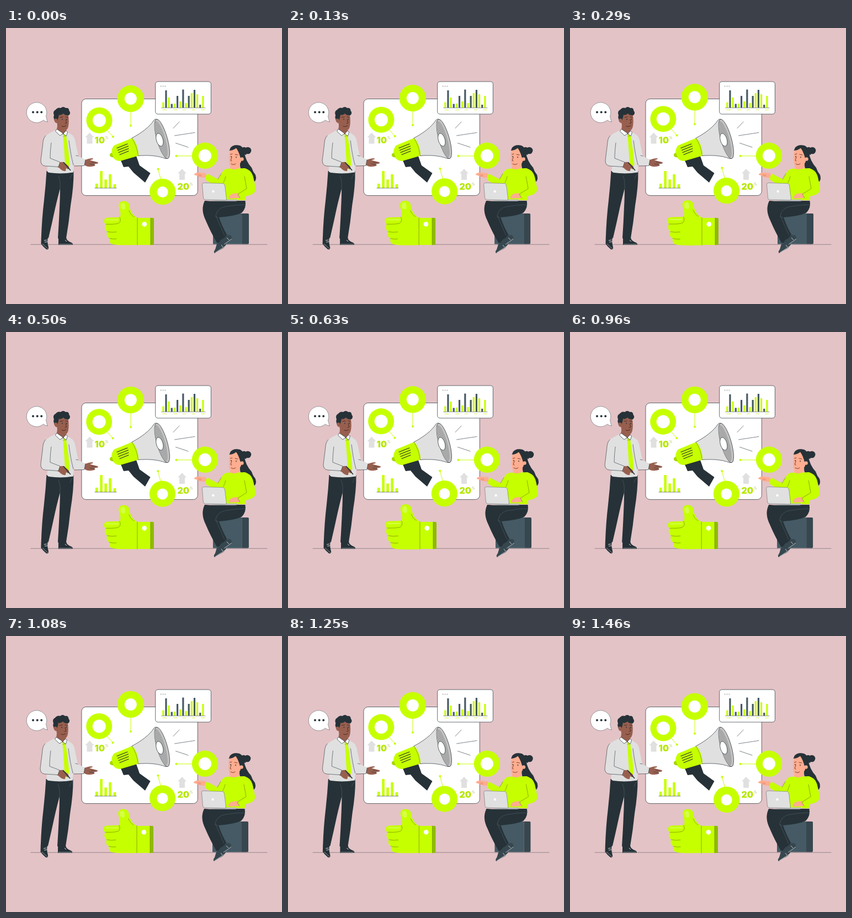
Recreate the animation shown at these times as an HTML page. Size 500 by 500 pixels, loop 1500 ms.

```html
<!DOCTYPE html>
<html lang="en">
<head>
<meta charset="utf-8">
<title>Marketing talk</title>
<style>
html, body { margin: 0; width: 100%; height: 100%; overflow: hidden; background: #e3c3c6; }
svg { display: block; width: 100vw; height: 100vh; }
.lime { fill: #c6ff00; }
.dark, .hair { fill: #263238; }
.white { fill: #fff; }
.grey { fill: #e0e0e0; }
.tan { fill: #985f4f; }
.peach { fill: #ffad90; }
.shoe { fill: #37474f; }
.line { fill: none; stroke: #263238; stroke-width: .6; stroke-linecap: round; stroke-linejoin: round; }
.edge { stroke: #263238; stroke-width: .7; stroke-linejoin: round; }
.fold { fill: none; stroke: #6f8f00; stroke-width: .7; stroke-linecap: round; }
.stem { fill: none; stroke: #c6ff00; stroke-width: 1; }
.num { font: 900 16px Inter, sans-serif; fill: #b5e800; }
.pct { font: 700 5.5px Inter, sans-serif; fill: #b9c98a; }
</style>
</head>
<body>
<svg viewBox="0 0 500 500" preserveAspectRatio="none">
  <rect width="500" height="500" fill="#e3c3c6"/>
  <path class="line" d="M45 392.200H473" stroke-opacity=".7"/>

  <!-- board -->
  <rect class="white edge" x="137" y="128.500" width="210.300" height="175" rx="8"/>
  <path class="grey" id="arrow" d="M151.5 189.5L159.5 198H156.5V209.5H146.5V198H143.5Z"/>
  <use href="#arrow" x="167.5" y="65.5"/>
  <text class="num" x="160.5" y="209">10</text><text class="pct" x="180" y="201">%</text>
  <text class="num" x="310.5" y="293">20</text><text class="pct" x="333" y="285">%</text>
  <g id="smallBars" class="lime"></g>
  <path class="line" d="M161 290H200"/>
  <path class="line" d="M303 181.500L314 170M305.500 195L342 189.500M307.500 208.500L330 216"/>

  <!-- megaphone -->
  <path class="dark" d="M208 240L236 232L242 249L261.500 263L252 280L231 262L222 251L213 252Z"/>
  <path class="grey edge" d="M227 200C246 190 260 179 268 167Q271 163 276 167L295 231Q296 237 289 236.500C274 231 257 230 239 231.500Z"/>
  <ellipse class="edge" cx="282.800" cy="201" rx="9.500" ry="37" transform="rotate(-16 282.800 201)" fill="#c4c4c4"/>
  <ellipse cx="281" cy="201.500" rx="7.500" ry="34" transform="rotate(-16 281 201.500)" fill="#a9a9a9"/>
  <ellipse class="white edge" cx="278.300" cy="202.500" rx="6" ry="12" transform="rotate(-16 278.300 202.500)"/>
  <path class="lime" d="M194 215Q196 212 200 211L228 199.500Q233 202 237 213T239.500 231.500L207 241Q198 241.500 193 233Q189 224 194 215Z"/>
  <path d="M191.500 226Q187 227.500 188 231Q190 235 195 234Z" fill="#a6d600"/>
  <path class="line" style="stroke-width:1.100" d="M201 217.500L220 210M202.500 221.500L221.500 214M204 225.500L222 218.500M206 229.500L222 223"/>
  <path class="fold" d="M228 199.500Q237 212 239.500 231.500"/>

  <!-- badges -->
  <g id="badgeTop">
    <path class="stem" d="M226 150V177"/><circle class="lime" cx="226" cy="177" r="2"/>
    <circle class="lime" cx="225.800" cy="128" r="24.200"/><circle class="white" cx="225.800" cy="128" r="11"/>
  </g>
  <g id="badgeLeft">
    <path class="stem" d="M182 184L194 197"/><circle class="lime" cx="193.800" cy="197" r="2"/>
    <circle class="lime" cx="169" cy="167.200" r="23.500"/><circle class="white" cx="169" cy="167.200" r="12"/>
  </g>
  <g id="badgeLow">
    <path class="stem" d="M281 276L275.500 256"/><circle class="lime" cx="275.500" cy="255.500" r="2"/>
    <circle class="lime" cx="283.700" cy="296.600" r="23.600"/><circle class="white" cx="283.700" cy="297" r="10"/>
  </g>
  <path class="stem" d="M309 231.800H340"/><circle class="lime" cx="308.500" cy="231.800" r="2"/>
  <circle class="lime" cx="360.500" cy="231.300" r="23.700"/><circle class="white" cx="360.500" cy="231.300" r="11.500"/>

  <!-- chart card -->
  <rect class="white edge" x="270.700" y="97.100" width="100.700" height="58.900" rx="4.500"/>
  <path d="M280.500 105.500h.01m4 0h.01m4 0h.01" stroke="#d5d5d5" stroke-width="3" stroke-linecap="round"/>
  <g id="cardBars"></g>
  <path class="line" d="M281.500 144.700H361" style="stroke-width:.5"/>
  <path d="M283.500 148.300H291M303 148.300H310M320 148.300H326M337 148.300H342.500M353.500 148.300H360" stroke="#c6ff00" stroke-width=".8"/>

  <!-- speech bubble -->
  <path class="white edge" stroke-opacity=".6" d="M72.500 160C74 164 74 168 75.500 170Q71 169.500 67.500 167A18.300 18.300 0 1 1 72.500 160Z"/>
  <path d="M49 152.500h.01m7.700 0h.01m7.500 0h.01" stroke="#263238" stroke-width="4" stroke-linecap="round"/>

  <!-- thumb -->
  <g id="thumb">
    <g id="hand">
      <path class="lime" d="M239 344.500C231 341 225 333 223.500 322C223 313 212 311.500 207 315.500C202 320 205 325 207 333Q208 340 206 342.800L184 343.500C176 344 176 353 181 355.500C178 360 179 366 183.500 369C181 374 183 379 187.500 381C186 387 189 391 194 392Q202 394 239 393Z"/>
      <path d="M207.500 321Q209 316 214 317Q217 323 215.500 328Q211 330 208.500 327Z" fill="#d6ff4a"/>
      <path d="M182 347.500H203" stroke="#d6ff4a" stroke-width="2" stroke-linecap="round"/>
      <path class="fold" d="M206 343Q209 349 205 353Q202 356 181 355.500M183.500 369Q192 371 200 369.500M187.500 381Q193 383 200 382M223 331Q226 339 232 342"/>
    </g>
    <path d="M261 344H266Q268 344 268 346V391Q268 393 266 393H261Z" fill="#8fba00"/>
    <path class="lime" d="M238 344H262V393H238Z"/>
    <path class="fold" d="M238 344V393M262 344V393"/>
    <circle class="white" cx="250.800" cy="355.400" r="4.300"/>
  </g>

  <!-- man -->
  <g id="man">
    <path class="dark" d="M63.800 380L76 379.500Q74 386 77 397Q78 402 73 401Q67 396 63.500 391Z"/>
    <path class="dark" d="M95 380.500L109 379.500Q110 386 119 389Q122 391 120.500 393H95Z"/>
    <path d="M66 391L76 400M96 391.800H120" stroke="#e0e0e0" stroke-width=".6"/>
    <path d="M69 385L74 384M70 388L75 387M107 384L110 387" stroke="#fff" stroke-width=".8"/>
    <path class="dark" d="M73.500 259H122.500Q123 285 117 322Q114 352 109 381H94Q96 350 97 325Q98 305 98 291Q94 305 89 327Q83 355 77 380.500H63.800Q65 345 69 312Q72 285 73.500 259Z"/>
    <path d="M98 291Q99 276 95 268M121 264Q117 268 116 273" fill="none" stroke="#53626a" stroke-width=".6"/>
    <path class="tan" d="M143 239.500Q149 236 157 236L158 237.500L152 239.500L166 243Q169 245 164 246L160 246Q164 249 158 250.500Q148 253 142 248Z"/>
    <path class="line" d="M155 243L163 245M152 246L160 248"/>
    <path class="grey" d="M112 190Q123 193 125 203L131 232L144 238.500L141.500 249.500L125 249Q121 244 119 235Z"/>
    <path class="grey" d="M90 185Q79 190 72 195Q82 204 79 225L74.500 257Q74 261 78 262Q100 265 122 261.500Q124 225 122 204Q120 192 112 189Z"/>
    <path class="line" d="M114 204Q117 229 122 248M131 232L127 231M124 250L142 249.500L144 238.500"/>
    <path class="lime" d="M103 190L107 190L109 195L113 222L115.500 247L111 257L107 247L105 215L103.500 196Z"/>
    <path class="fold" d="M104 196L109 195"/>
    <path class="tan" d="M93 177L109 178L109 190L104 193L92 185Z"/>
    <path class="white edge" d="M92 183L89.500 187L98 195L103.500 191Z M109 186L104 191L109 196L111.500 189Z"/>
    <path class="tan" d="M91 158Q102 148 112.500 156Q115 170 112.500 180Q110 187 104 186Q96 185 93 177Z"/>
    <path class="hair" d="M89 169Q85 163 87 158Q84 151 90 148Q94 143 99 145Q104 141 108 145Q114 144 114.500 150Q118 154 114 158Q108 159 104 155Q99 159 96 157Q95 164 93 168Z"/>
    <path class="tan" d="M93 165Q87 162 87.500 168Q89 173 94 172Z"/>
    <path d="M98 162L103 161M108 161L112 162M101 178Q105 180 109 177M108 166L110 172L107 173" fill="none" stroke="#3a211b" stroke-width=".8" stroke-linecap="round"/>
    <circle class="dark" cx="102" cy="165.500" r=".9"/><circle class="dark" cx="110" cy="165.500" r=".9"/>
    <path class="tan" d="M94 245Q101 241 106 244L113 250Q116 254 113 256L109 254L108 259Q102 260 97 254L92 251Z"/>
    <path d="M104 243L117 258" stroke="#263238" stroke-width="1.600"/>
    <path class="grey" d="M72 195Q67 199 66.500 212L63 240Q63 249 71 250L95 251.500L98 243L81 237L83 211Q82 200 72 195Z"/>
    <path class="line" d="M82 208Q80 224 80 236L98 243L95 251.500L71 250Q63 249 63 240L66.500 212Q67 199 72 195"/>
  </g>

  <!-- woman -->
  <g id="woman">
    <path d="M375 336H428V391.500H375Z" fill="#455a64"/>
    <path class="shoe" d="M428 336H438Q440 336 440 338V389.500Q440 391.500 438 391.500H428Z"/>
    <path class="hair" d="M406 218Q411 210 424 213Q431 216 432 226Q434 241 445 253Q447 260 452 266Q455 276 449 279Q440 284 438 273Q425 265 423 243Z"/>
    <circle class="hair" cx="438" cy="222" r="6.300"/>
    <path class="hair" d="M428 217Q433 213 438 221L435 230L429 228Z"/>
    <path class="peach" d="M362 263Q356 263 352 262L346 262Q340 264 341 266L347 268Q354 272 363 271Z"/>
    <path d="M347 266L354 266M349 268L355 268" stroke="#c46a54" stroke-width=".5"/>
    <path class="lime" d="M400 255Q394 256 390 264L384 274L365 264Q361 268 361.500 275L380 287Q388 288 394 280L394 312H434V304Q448 303 452 294Q451 280 446 266Q443 257 433 254Z"/>
    <path class="peach" d="M408 242H424L424 253Q414 259 406 254Z"/>
    <path class="peach" d="M406 219Q417 212 424 223L427 238Q425 248 417 251Q408 254 405 247Q403 236 406 219Z"/>
    <path class="hair" d="M404.500 222Q409 210 423 213Q431 218 430 235L425 236Q422 224 417 217.500Q411 222 404.500 222Z"/>
    <circle class="peach" cx="427.500" cy="237.500" r="3.200"/>
    <path d="M406.500 229L410 228M415 229L420 230M409 234L407 240L409 241M408 246Q412 249 416 246" fill="none" stroke="#4a2a26" stroke-width=".8" stroke-linecap="round"/>
    <circle class="dark" cx="408" cy="233" r=".9"/><circle class="dark" cx="417" cy="234" r=".9"/>
    <path class="dark" d="M360 313H433.500Q436 326 427 335Q413 341 386 343Q391 359 402 378L390 387Q386 390 382 389Q370 368 362 349Q352 329 360 313Z"/>
    <path d="M434 320Q415 320 395 324Q382 328 380 340L396 376M379 341L385 344" fill="none" stroke="#53626a" stroke-width=".6"/>
    <path class="shoe" d="M390 383Q396 381 399 375L406 375Q410 378 409 382L394 392L383 392Z"/>
    <path class="shoe" d="M382 391Q390 391 396 389L399 392Q397 398 386 403L378 408Q375 406 379 401Z"/>
    <path d="M409 382L395 392M399 394L379 407" stroke="#e0e0e0" stroke-width=".7"/>
    <path d="M400 380L404 384M390 393L393 397" stroke="#fff" stroke-width=".7"/>
    <path class="peach" d="M425 300Q413 298 407 302L403 307L406 309L423 308Z"/>
    <path class="lime" d="M433 256Q444 256 448 270L452 290Q453 298 444 302L424 308L420 301L436 291L431 274Z"/>
    <path class="fold" d="M432 269Q434 280 436 291L420 301L424 308M390 264L384 274M394 280Q397 274 398 269"/>
    <path d="M396 310.500H419Q420 313.500 416 313.800H362Z" fill="#bdbdbd"/>
    <path class="grey edge" stroke-opacity=".55" d="M358 280.500L393 281.500Q396 282 396.500 285L399.500 309Q400 312 397 312L361 311Q358 311 357.500 308L355.500 284Q355 281 358 280.500Z"/>
    <circle class="white" cx="375.500" cy="296" r="2.200"/>
  </g>
</svg>
<script>
const LOOP = 1500;
const $ = id => document.getElementById(id);

function bars(id, base, width, list) {
  $(id).innerHTML = list.map(([x, top, dark]) =>
    `<rect class="${dark ? '' : 'lime'}" ${dark ? 'fill="#455a64"' : ''} x="${x - width / 2}" y="${top}" width="${width}" height="${base - top}"/>`
  ).join('');
}

bars('smallBars', 290, 4.6, [[164.3, 282], [172.6, 259], [180.6, 274.5], [188.6, 265], [197, 283]]);
const tops = [134.5, 113, 126, 137.5, 137, 123, 133, 111.5, 136, 123, 118, 112, 120, 139, 123];
bars('cardBars', 144.5, 3.2, tops.map((top, i) => [284.8 + i * 5.15, top, i % 2]));

// Eased path through [time, value] stops.
function along(stops, t) {
  const i = stops.findIndex(s => s[0] > t);
  const [t0, a] = stops[i - 1], [t1, b] = stops[i];
  return a + (b - a) * (1 - Math.cos(Math.PI * (t - t0) / (t1 - t0))) / 2;
}

const sway = [[0, 0], [100, -1], [290, 1], [500, -.1], [630, 1], [830, 1.4], [1080, -1], [1460, 0], [1500, 0]];
const pulse = [[0, 0], [290, 1], [500, 0], [630, 1], [830, .3], [1080, 0], [1500, 0]];
const move = (id, x, y) => $(id).setAttribute('transform', `translate(${x} ${y})`);

function draw(t) {
  // Rise and fall once per loop, quicker to leave than a plain cosine.
  const s = Math.sin(Math.PI * t / LOOP);
  const lift = (s + s * s) / 2;
  move('badgeTop', 0, -6 * lift);
  move('badgeLeft', -.4 * lift, -5.6 * lift);
  move('badgeLow', -.3 * lift, -4.2 * lift);

  const dx = along(sway, t);
  ['man', 'woman', 'thumb'].forEach(id => move(id, dx, 0));

  const k = 1 + .045 * along(pulse, t);
  $('hand').setAttribute('transform', `translate(239 370) scale(${k} ${1 + (k - 1) * .6}) translate(-239 -370)`);
}

const start = performance.now();
function tick() {
  draw((performance.now() - start) % LOOP);
  requestAnimationFrame(tick);
}
draw(0);
requestAnimationFrame(tick);
</script>
</body>
</html>
```
